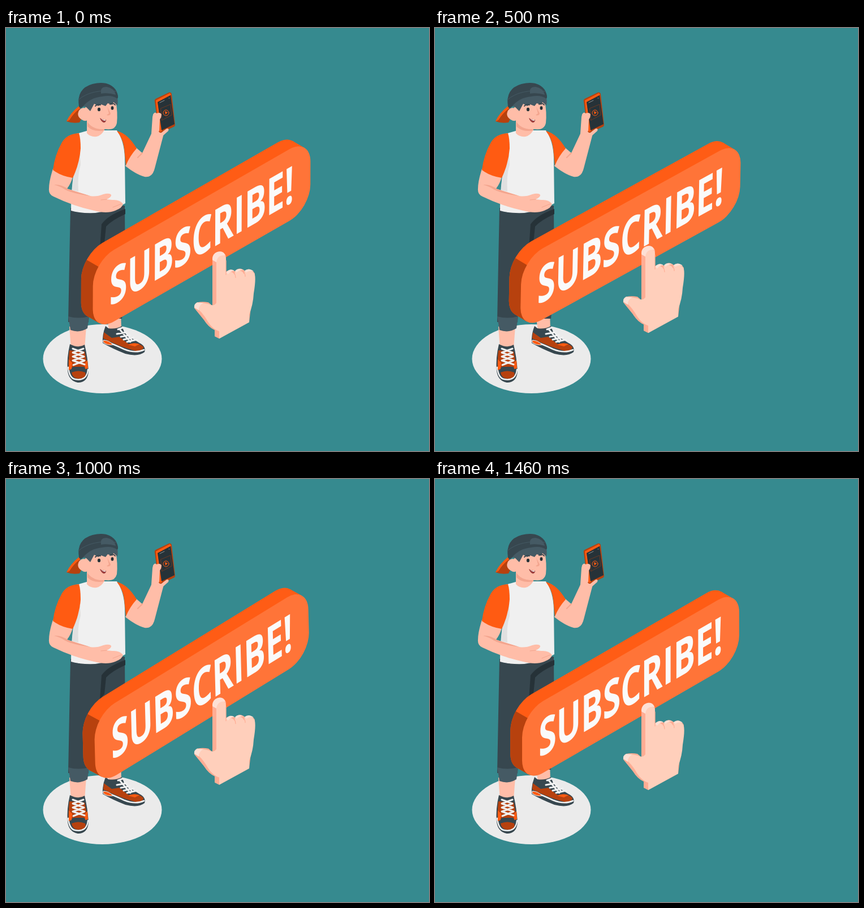
Animation of 748x748 px, one loop 1.5 s. Source, as an HTML page:

```html
<!DOCTYPE html>
<html lang="en">
<head>
<meta charset="utf-8">
<title>Subscribe</title>
<style>
  html, body { margin: 0; width: 100%; height: 100%; overflow: hidden; background: #368a8f; }
  svg { display: block; width: 100vw; height: 100vh; }
  .skin { fill: #ffbda8; }
  .shade { fill: #f3a58e; }
  .orange { fill: #ff5b12; }
  .rust { fill: #b7410e; }
  .slate { fill: #455a64; }
  .dark { fill: #37474f; }
  .deep { fill: #263238; }
  .white { fill: #f0f0f0; }
  .line { fill: none; stroke-linecap: round; stroke-linejoin: round; }
  .label { font: 700 90px "Open Sans", "Noto Sans", sans-serif; fill: #fafafa; text-anchor: middle; }
</style>
</head>
<body>
<svg viewBox="0 0 748 748">
  <defs>
    <clipPath id="sideClip"><path d="M-60 -57L100 103V220H-60Z"/></clipPath>
    <g id="extrusion">
      <rect x="-24" y="-24" width="443.4" height="127" rx="43"/>
      <path d="M12.6 114.4L-11.4 90.4L406.8 -11.4L430.8 12.6Z"/>
    </g>
  </defs>

  <ellipse cx="170.500" cy="585" rx="105" ry="61" fill="#ebebeb"/>

  <g id="rightShoe">
    <path class="skin" d="M177 500H203L204 533Q194 541 182 534Z"/>
    <path class="dark" d="M176 527Q170 542 171 557Q188 567 211 576Q234 582 245 573Q248 563 236 557L215 544Q207 536 205 527Q194 533 181 531Z"/>
    <path class="rust" d="M173 538L187 548L200 546L215 557Q235 555 243 564Q243 571 229 571Q205 565 172 549Z"/>
    <path class="dark" d="M181 532L203 535L218 548L231 556L217 559L201 546L190 544Z"/>
    <path class="line" d="M173 553Q190 559 209 568Q229 576 244 569" stroke="#f0f0f0" stroke-width="2.500"/>
    <path class="orange" stroke="#f0f0f0" d="M172 552Q182 552 189 560Q180 562 172 556Z"/>
    <path class="orange" d="M216 560Q226 556 236 559L228 563Z"/>
    <path class="line" d="M198 533L206 530M196 541L213 538M203 546L219 543M208 551L226 547M214 555L232 551M202 534L212 546L220 555M210 536L222 551" stroke="#f0f0f0" stroke-width="3"/>
  </g>

  <g id="leftShoe">
    <path class="skin" d="M112 528L115 567H139L142 528Z"/>
    <path class="dark" d="M113 559Q107 584 109 606Q111 624 127 627Q145 627 146 606Q144 580 139 560Q128 567 113 559Z"/>
    <path class="rust" d="M112 570Q110 590 111 604L119 599H137L144 602Q142 584 139 572Z"/>
    <path class="rust" d="M116 609Q128 604 140 609Q143 619 131 620Q118 621 116 609Z"/>
    <path class="line" d="M110 600Q112 619 122 621Q143 625 145 604" stroke="#f0f0f0" stroke-width="2.500"/>
    <path class="orange" d="M111 586L117 592L116 603L111 605ZM144 587L139 594L140 603L145 602Z"/>
    <path class="line" d="M118 567L137 574L118 581L139 588L119 596M137 567L118 574L138 581L118 588L139 595" stroke="#f0f0f0" stroke-width="3"/>
  </g>

  <g id="trousers">
    <path class="dark" d="M114 318L210 314L211 455L205 514H174L169 400L148 470L146 520H110L112 415Z"/>
    <path class="slate" d="M110 510Q128 515 147 510L144 531Q130 540 114 534Z"/>
    <path class="deep" d="M211 320Q180 331 169 347L166 390L174 380L177 351Q187 340 211 329Z"/>
  </g>

  <g id="torso">
    <path class="white" d="M125 187L146 181H172L196 181Q209 199 210 229L211 310Q190 323 158 327Q130 328 115 323Q115 290 119 262Z"/>
    <path fill="#e0e0e0" d="M131 222L132 242Q126 260 128 289L117 287L119 262Z"/>
    <path class="skin" d="M143 163V186Q149 193 160 192Q169 190 174 180L171 165Z"/>
    <path class="shade" d="M144 166Q153 180 174 179V181Q155 185 144 174Z"/>
    <path class="skin" d="M227 209L241 221L257 187L259 158Q261 147 267 151L285 175Q288 181 279 187L263 248Q259 265 245 263Q230 259 211 244Z"/>
    <path class="orange" d="M196 182Q216 187 231 213Q219 226 212 243L209 213Q207 196 196 182Z"/>
    <path class="line" d="M241 221L233 229" stroke="#f3a58e" stroke-width="2"/>
    <path class="skin" d="M83 249Q76 271 76 284Q75 294 84 298Q119 315 156 323Q178 329 193 323Q206 318 207 311Q201 303 188 304L178 303Q187 299 186 295Q183 291 172 294Q160 299 149 297L108 284Q115 275 118 263Q98 261 83 249Z"/>
    <path class="shade" d="M85 277Q98 276 110 285L149 297Q119 293 105 286Q96 280 85 277Z"/>
    <path class="line" d="M178 303L168 304M189 317L204 311" stroke="#f3a58e" stroke-width="1"/>
    <path class="orange" d="M129 186Q108 187 99 202Q86 225 83 251Q97 262 118 265Q130 240 132 213Q132 195 129 186Z"/>
  </g>

  <g id="phone">
    <path class="rust" d="M263 130Q262 127 265 125L288 114Q292 113 293 117L299 171Q299 174 296 175L275 185Q271 186 270 182Z"/>
    <path class="orange" d="M265 128L290 115L292 118L268 131L276 182L272 184L270 179Z"/>
    <path class="deep" d="M268 131L291 119L298 170L275 181Z"/>
    <path class="line" d="M274 142L291 135L293 154L276 163Z" stroke="#7b3b20" stroke-width=".8"/>
    <circle cx="283" cy="150" r="5" class="line" stroke="#ff5b12"/>
    <path class="orange" d="M281 147L286 149L282 153Z"/>
    <path class="line" d="M272 132L280 128M288 124H289" stroke="#8e9699"/>
    <path class="skin" d="M259 165L260 153Q263 147 266 151Q273 148 275 153Q275 158 272 162L271 182L262 184Z"/>
    <path class="skin" d="M274 186Q278 182 284 178Q289 177 287 182L278 190Z"/>
  </g>

  <g id="head">
    <path class="rust" d="M130 138Q115 149 107 165Q117 169 130 167L135 157Z"/>
    <path class="orange" d="M129 138Q114 150 107 165L112 163Q119 151 131 142Z"/>
    <path class="skin" d="M139 143L147 129H194Q198 150 196 168Q193 181 178 179Q154 180 146 166Q140 161 139 143Z"/>
    <path class="skin" d="M146 145Q136 137 129 146Q124 156 134 162Q141 167 148 161Z"/>
    <path class="slate" d="M134 140L146 123L195 118Q199 126 197 137L190 131L188 136L180 133L176 138L168 135L163 138L156 134L149 147L143 141Q139 137 134 140Z"/>
    <path class="dark" d="M129 139Q124 107 153 99Q183 92 195 111Q200 122 197 125Q187 118 171 121Q148 123 135 140Q132 144 129 139Z"/>
    <path class="slate" d="M168 113Q167 104 178 104Q191 106 194 118Q180 114 168 116Z"/>
    <path class="line" d="M128 127Q151 107 195 112" stroke="#455a64" stroke-width="1"/>
    <path class="shade" d="M179 139L185 151Q184 156 178 154L182 151Z"/>
    <ellipse class="deep" cx="164.500" cy="144" rx="2.600" ry="3.300"/>
    <ellipse class="deep" cx="188" cy="141.500" rx="2.400" ry="3.300"/>
    <path class="line" d="M158 138Q162 134 167 136M184 135Q189 131 193 136" stroke="#37474f" stroke-width="2"/>
    <path fill="#9c3d3d" d="M166 159Q171 163 177 162Q177 168 172 167Q168 165 166 159Z"/>
    <path class="white" d="M168 160Q172 163 176 162V164Q171 164 168 160Z"/>
  </g>

  <g id="button">
    <g transform="matrix(.866 -.5 0 1 154 414)">
      <use href="#extrusion" fill="#ff5c15"/>
      <g clip-path="url(#sideClip)"><use href="#extrusion" fill="#b7410e"/></g>
      <rect width="443.400" height="127" rx="43" fill="#ff7438"/>
      <text class="label" transform="translate(221.7 96.5) scale(.736 1)">SUBSCRIBE!</text>
    </g>
  </g>

  <g id="hand">
    <path fill="#ffad94" d="M365 408Q366 400 373 397Q384 393 389 404V432Q398 425 405 431Q413 422 422 430Q433 423 440 435L430 521L377 550L369 546V535Q358 530 350 517L333 496Q332 490 338 486Q348 484 358 486L365 492Z"/>
    <path fill="#ffcfbb" d="M372 413Q373 403 381 401Q389 401 389 411V433Q396 429 402 434L404 437L405 431Q414 427 419 433L421 436L422 430Q436 426 440 437Q442 446 438 470Q437 490 430 507V521L377 550V537Q366 534 357 520Q349 506 341 499Q341 489 349 487L359 489Q367 494 372 487Z"/>
    <path fill="#fde0d5" d="M365 408Q366 400 373 397Q384 393 388 403Q374 401 372 415L365 411ZM389 433Q396 425 404 430Q397 430 393 436ZM405 430Q411 424 420 429Q413 428 408 433ZM422 430Q429 424 438 431Q430 429 425 433ZM333 495Q332 489 338 486L349 487Q341 491 341 500Z"/>
    <path class="line" d="M389 412V437M403 433Q406 437 406 442M420 432Q423 435 423 440" stroke="#ffad94" stroke-width="1.200"/>
  </g>
</svg>
<script>
  const LOOP = 1500, LEAD = 35;
  const button = document.getElementById("button");
  const hand = document.getElementById("hand");

  function draw() {
    const p = (performance.now() + LEAD) % LOOP / LOOP;
    const swing = Math.asin(Math.sin(2 * Math.PI * p)) * 2 / Math.PI;
    const lift = 1 - Math.abs(2 * p - 1);
    button.setAttribute("transform", `rotate(${2 * swing} 335.5 360)`);
    hand.setAttribute("transform", `translate(0 ${-15 * lift})`);
    requestAnimationFrame(draw);
  }
  draw();
</script>
</body>
</html>
```
